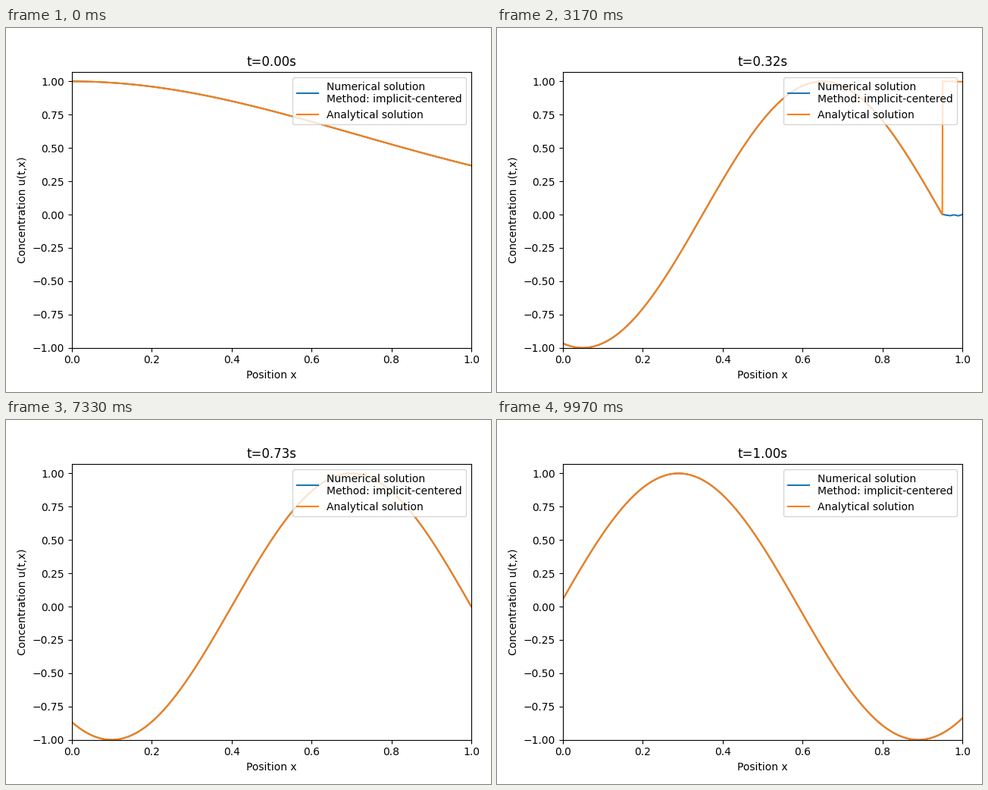
A matplotlib script for the animation above (10000 ms loop, 640 by 480 pixels).

```python
import numpy as np
import matplotlib.pyplot as plt
from matplotlib.animation import FuncAnimation

STEPS = 300
FRAMES = 400
LOOP_MS = 10000
SPEED = 3.0
NODES = 100


def initial(x):
    return np.exp(-x**2)


def inflow(t):
    return np.sin(5 * np.pi * t)


def analytical(x, t):
    behind = x < SPEED * t
    return np.where(behind, inflow(t - x / SPEED), initial(x - SPEED * t))


def implicit_centered(x, times):
    """Backward Euler with centred differences; the inflow fills the region behind the front."""
    half = SPEED * (times[1] - times[0]) / (x[1] - x[0]) / 2
    n = len(x)
    matrix = np.eye(n) - half * np.eye(n, k=1) + half * np.eye(n, k=-1)
    matrix[0] = np.eye(n)[0]
    matrix[-1] = np.eye(n)[-1]
    inverse = np.linalg.inv(matrix)

    u = initial(x)
    history = [u]
    for t in times[1:]:
        rhs = u.copy()
        rhs[0], rhs[-1] = inflow(t), 0
        u = np.where(x < SPEED * t, inflow(t - x / SPEED), inverse @ rhs)
        history.append(u)
    return history


times = np.arange(STEPS) / STEPS
coarse = np.linspace(0, 1, NODES)
fine = np.linspace(0, 1, 1000)
numerical = implicit_centered(coarse, times)

fig, ax = plt.subplots(figsize=(6.4, 4.8), dpi=100)
num_line, = ax.plot(coarse, numerical[0],
                    label="Numerical solution\nMethod: implicit-centered")
exact_line, = ax.plot(fine, analytical(fine, 0), label="Analytical solution")
ax.set_xlim(0, 1)
ax.set_ylim(-1, 1.07)
ax.set_xlabel("Position x")
ax.set_ylabel("Concentration u(t,x)")
title = ax.set_title("t=0.00s")
ax.legend(loc="upper right")
fig.tight_layout()
fig.subplots_adjust(top=0.879)


def update(frame):
    # Nearest simulation step, halves rounded up.
    step = (2 * frame * STEPS + FRAMES) // (2 * FRAMES)
    t = times[step]
    num_line.set_ydata(numerical[step])
    exact_line.set_ydata(analytical(fine, t))
    title.set_text(f"t={t:.2f}s")
    return num_line, exact_line, title


anim = FuncAnimation(fig, update, frames=FRAMES, interval=LOOP_MS // FRAMES,
                     repeat=True, repeat_delay=0, blit=False)
plt.show()
```
